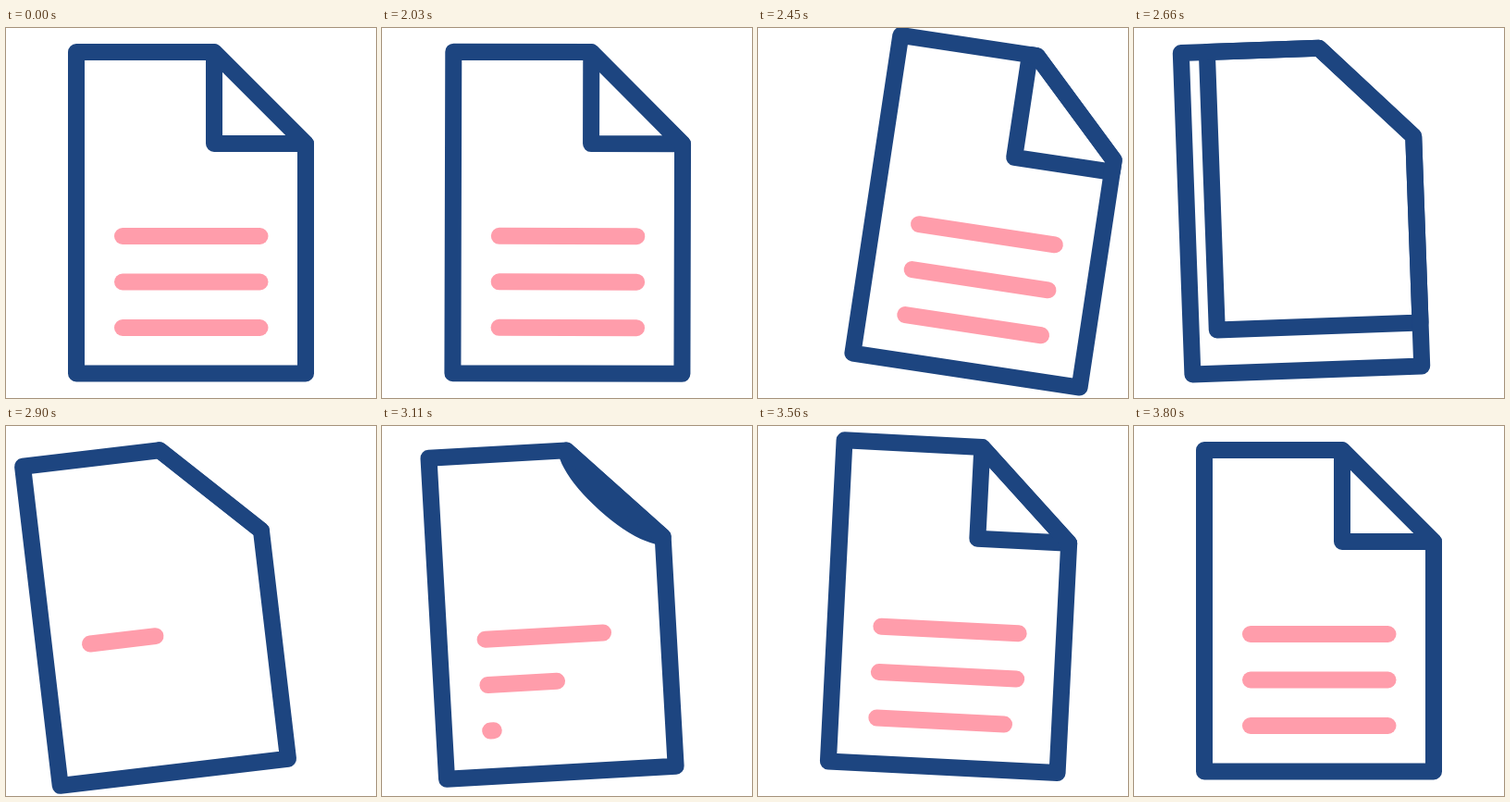
An HTML page that plays this animation: 400x400 px, repeating every 3830 ms.

```html
<!DOCTYPE html>
<html lang="en">
<head>
<meta charset="utf-8">
<title>Document page turn</title>
<style>
  html, body { margin: 0; width: 100%; height: 100%; overflow: hidden; background: #fff; }
  svg { display: block; width: 100%; height: 100%; }
  path { fill: none; stroke-width: 18; stroke-linecap: round; stroke-linejoin: round; }
  .ink { stroke: #1d4580; }
  .text { stroke: #ff9dab; }
</style>
</head>
<body>
<svg viewBox="0 0 400 400">
  <g id="page">
    <path class="text"/>
    <path class="text"/>
    <path class="text"/>
    <path id="fold" class="ink"/>
    <path class="ink" d="M76 26H225L324 125V373.5H76Z"/>
  </g>
</svg>
<script>
const LOOP = 3830, START = 2030, STEP = 30;
const page = document.getElementById('page');
const fold = document.getElementById('fold');
const lines = [...document.querySelectorAll('.text')];

// time, angle, x offset, y offset of the swinging page
const sway = [
  [2000, 0, 0, 0],
  [2400, 8.95, 53.5, -1.3],
  [2450, 8.59, 51, -1.5],
  [2555, 4, 23, -5.5],
  [2660, -2.08, -19, -3.5],
  [2870, -6.85, -39.2, 2.4],
  [2900, -6.72, -38.5, 2],
  [3080, -4, -20, 1.8],
  [3320, 3.92, 14, -5.5],
  [3400, 4.6, 16, -7],
  [3635, 1.85, 4.6, -3],
  [3800, 0, 0, 0]
];

const lerp = (a, b, p) => a + (b - a) * p;
const progress = (t, from, to) => Math.min(1, Math.max(0, (t - from) / (to - from)));
const smooth = p => p * p * (3 - 2 * p);

const slope = (i, c) => (sway[i + 1][c] - sway[i][c]) / (sway[i + 1][0] - sway[i][0]);

function tangent(i, c) {
  if (i === 0 || i === sway.length - 1) return 0;
  const a = slope(i - 1, c), b = slope(i, c);
  return a * b <= 0 ? 0 : 2 * a * b / (a + b);
}

// monotone cubic through the sway keys
function swayAt(t, c) {
  const last = sway.length - 1;
  if (t <= sway[0][0] || t >= sway[last][0]) return 0;
  const i = sway.findIndex(key => key[0] > t) - 1;
  const span = sway[i + 1][0] - sway[i][0];
  const p = (t - sway[i][0]) / span;
  const q = 1 - p;
  return lerp(sway[i][c], sway[i + 1][c], smooth(p))
    + span * p * q * (q * tangent(i, c) - p * tangent(i + 1, c));
}

// the sheet is pulled down to the lower left corner
function unrolled(t) {
  const p = smooth(progress(t, 2400, 2760));
  const x = lerp(225, 76, p), y = lerp(125, 373.5, p);
  return `M${x} 26V${y}H324V125L225 26Z`;
}

// a new corner bends in from the diagonal
function bent(t) {
  const p = smooth(progress(t, 2950, 3480));
  const h = 49.5 * (1 - p);
  const x = 225 + h, y = 125 - h;
  return `M225 26C225 26 225 ${y - h} ${x} ${y}C${x + h} 125 324 125 324 125Z`;
}

function draw(t) {
  const [angle, dx, dy] = [1, 2, 3].map(c => swayAt(t, c));
  page.setAttribute('transform',
    `translate(${200 + dx} ${199.5 + dy}) rotate(${angle}) translate(-200 -199.5)`);

  const pulling = t < 2700;
  fold.setAttribute('d', t < 2800 ? unrolled(t) : bent(t));
  fold.style.fill = pulling ? '#fff' : 'none';

  lines.forEach((line, i) => {
    const start = 2705 + 198 * i;
    const grown = pulling ? 1 : 1 - (1 - progress(t, start, start + 555)) ** 1.5;
    const y = 225 + 49.5 * i;
    line.setAttribute('d', grown > 0 ? `M126 ${y}H${126 + 148.5 * grown}` : '');
  });
}

const origin = performance.now();
function tick() {
  const t = (performance.now() - origin) % LOOP;
  draw(t < START ? 0 : START + Math.floor((t - START) / STEP) * STEP);
  requestAnimationFrame(tick);
}
tick();
</script>
</body>
</html>
```
